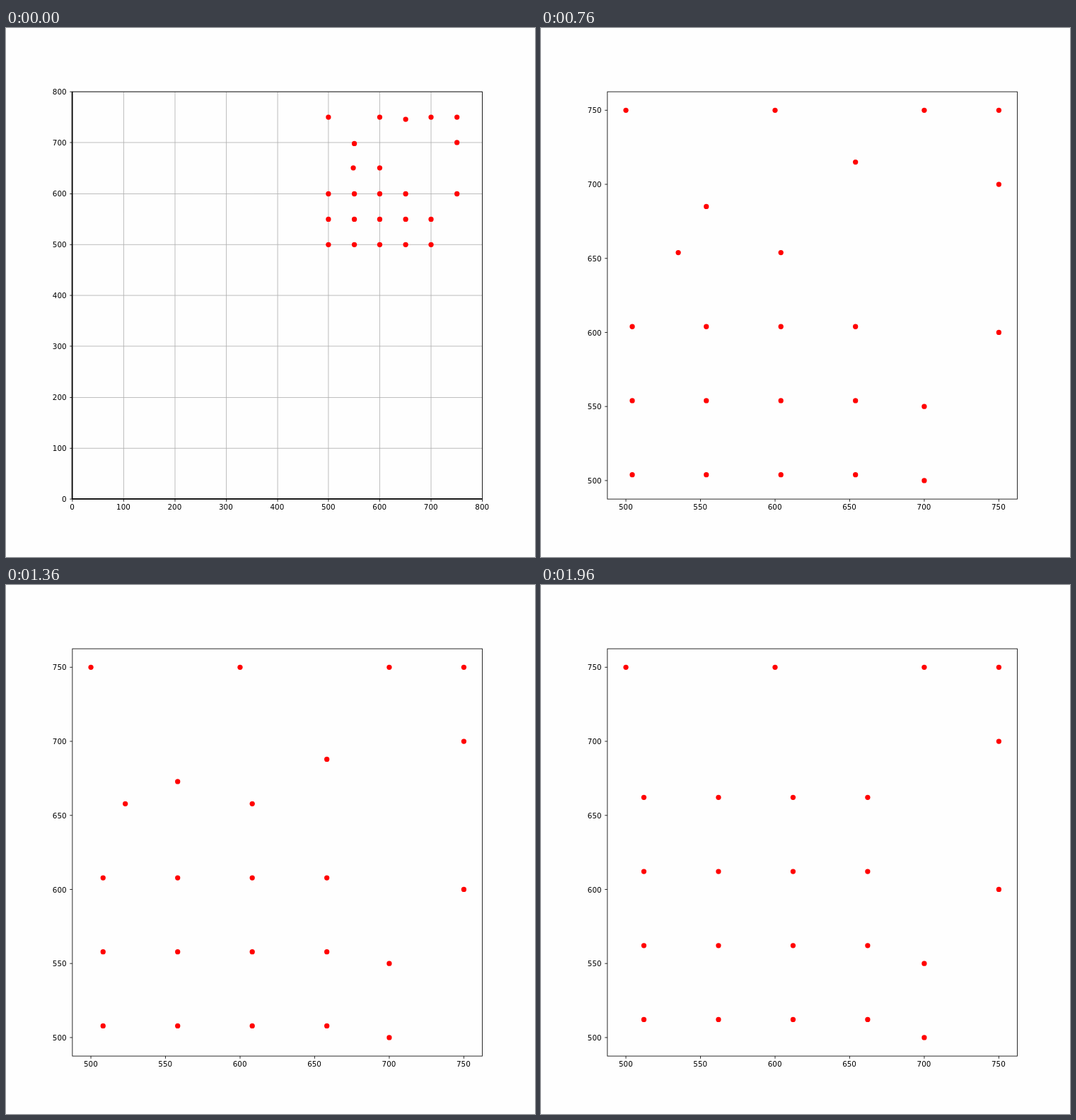
Write an HTML page with a canvas that moves like this. It is 748x748 px and loops after 4 s.

```html
<!DOCTYPE html>
<html lang="en">
<head>
<meta charset="utf-8">
<title>Points gathering into a grid</title>
<style>
  html, body { margin: 0; width: 100%; height: 100%; overflow: hidden; background: #fefefe; }
  canvas { display: block; }
</style>
</head>
<body>
<canvas id="stage" width="748" height="748"></canvas>
<script>
// The figure is laid out on a 1000-unit square and scaled to the stage.
const STAGE = 748, SIZE = 1000, PT = 100 / 72;
const STEP_MS = 40, LAST_STEP = 49, LOOP_MS = 4000;
const LEFT = 125, RIGHT = 900, TOP = 120, BOTTOM = 890;
const ctx = document.getElementById("stage").getContext("2d");
ctx.scale(STAGE / SIZE, STAGE / SIZE);

const overview = { min: 0, max: 800, ticks: range(0, 800, 100), grid: true };
const closeUp = { min: 487.5, max: 762.5, ticks: range(500, 750, 50), grid: false };

const resting = [
  [500, 750], [600, 750], [700, 750], [750, 750],
  [750, 700], [750, 600], [700, 550], [700, 500]
];
const topRowStarts = [[550, 650], [550, 700], [600, 650], [650, 750]];
const movers = [];
for (let row = 0; row < 4; row++) {
  for (let col = 0; col < 4; col++) {
    const x = 500 + 50 * col, y = 500 + 50 * row;
    movers.push({ from: row === 3 ? topRowStarts[col] : [x, y], to: [x + 12, y + 12] });
  }
}

function range(first, last, step) {
  const values = [];
  for (let v = first; v <= last; v += step) values.push(v);
  return values;
}

// Snaps to the middle of a layout unit; the small term absorbs rounding errors.
const snap = v => Math.floor(v + 0.5 + 1e-6) + 0.5;

function line(x1, y1, x2, y2, color, width = 0.8 * PT) {
  ctx.strokeStyle = color;
  ctx.lineWidth = width;
  ctx.beginPath();
  ctx.moveTo(x1, y1);
  ctx.lineTo(x2, y2);
  ctx.stroke();
}

function drawAxes(view, toX, toY) {
  const left = snap(LEFT), right = snap(RIGHT), top = snap(TOP), bottom = snap(BOTTOM);
  const tick = 3.5 * PT;
  if (view.grid) {
    for (const v of view.ticks) {
      line(snap(toX(v)), top, snap(toX(v)), bottom, "#b0b0b0");
      line(left, snap(toY(v)), right, snap(toY(v)), "#b0b0b0");
    }
    line(LEFT, top, LEFT, bottom, "#000", 1.5 * PT);
    line(left, BOTTOM, right, BOTTOM, "#000", 1.5 * PT);
  }
  ctx.font = `${10 * PT}px "DejaVu Sans", sans-serif`;
  ctx.fillStyle = "#000";
  for (const v of view.ticks) {
    const x = toX(v), y = toY(v);
    line(snap(x), bottom, snap(x), bottom + tick, "#000");
    line(left - tick, snap(y), left, snap(y), "#000");
    ctx.textAlign = "center";
    ctx.fillText(v, x, BOTTOM + 21);
    ctx.textAlign = "right";
    ctx.fillText(v, LEFT - 10.5, y + 6);
  }
  ctx.strokeStyle = "#000";
  ctx.lineWidth = 0.8 * PT;
  ctx.strokeRect(left, top, right - left, bottom - top);
}

function draw(time) {
  const step = Math.min(LAST_STEP, Math.floor((time % LOOP_MS) / STEP_MS));
  const view = step === 0 ? overview : closeUp;
  // The opening overview already shows the points two steps into their move.
  const progress = (step || 2) / LAST_STEP;
  const share = v => (v - view.min) / (view.max - view.min);
  const toX = v => LEFT + share(v) * (RIGHT - LEFT);
  const toY = v => BOTTOM - share(v) * (BOTTOM - TOP);

  ctx.fillStyle = "#fefefe";
  ctx.fillRect(0, 0, SIZE, SIZE);
  drawAxes(view, toX, toY);

  const moved = movers.map(({ from, to }) =>
    from.map((start, i) => Math.floor(start + (to[i] - start) * progress + 1e-9)));
  ctx.fillStyle = "#f00";
  for (const [x, y] of [...resting, ...moved]) {
    ctx.beginPath();
    ctx.arc(snap(toX(x)), snap(toY(y)), 3.5 * PT, 0, 2 * Math.PI);
    ctx.fill();
  }
}

const begin = performance.now();
function animate() {
  draw(performance.now() - begin);
  requestAnimationFrame(animate);
}
animate();
</script>
</body>
</html>
```
